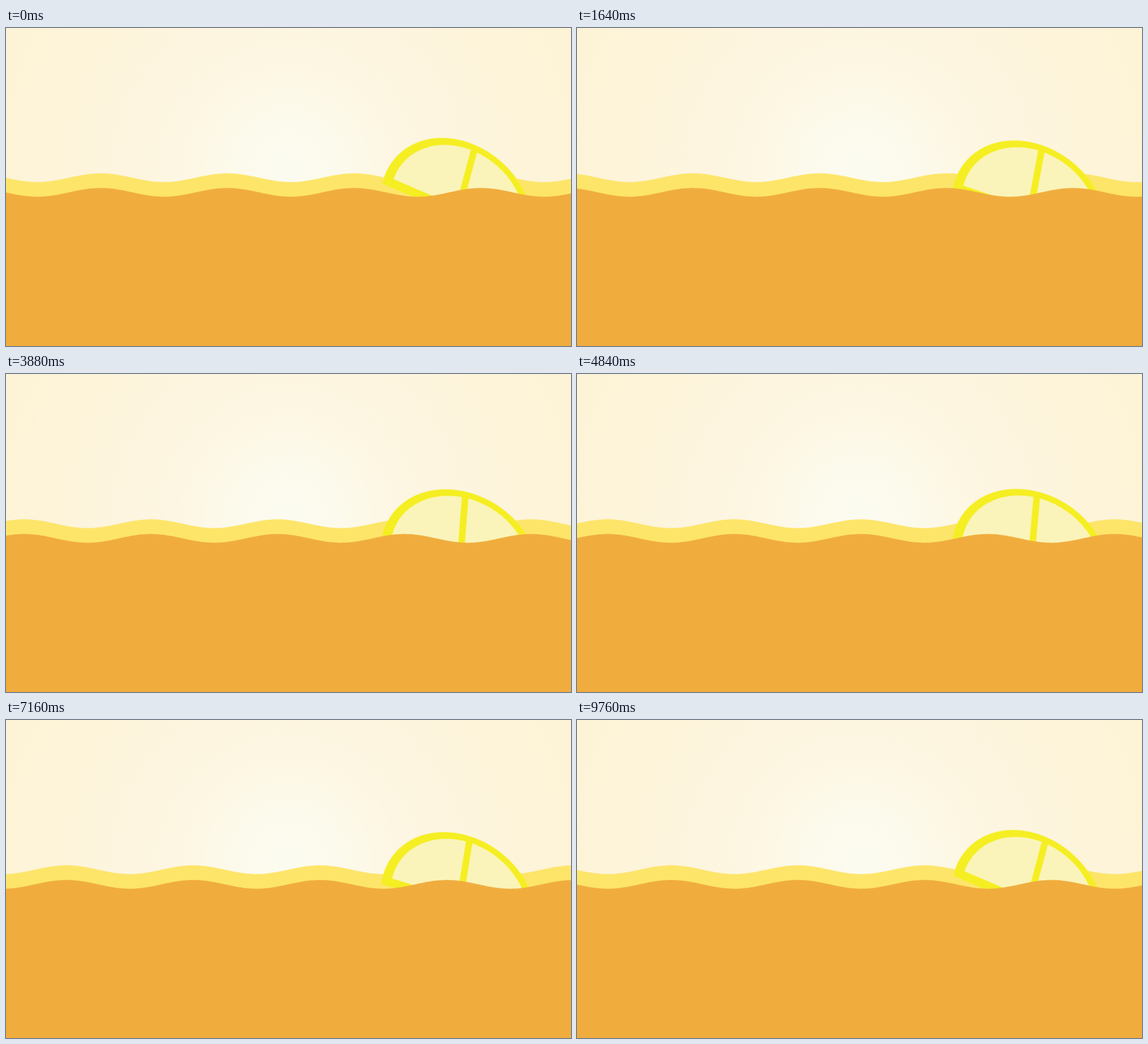
An HTML page for the animation above (9800 ms loop, 997 by 561 pixels).

```html
<!DOCTYPE html>
<html lang="en">
<head>
<meta charset="utf-8">
<title>Lemon on the waves</title>
<style>
  html, body { margin: 0; width: 100%; height: 100%; overflow: hidden; background: #fdf4d8; }
  svg { display: block; width: 997px; height: 561px; }

  .wave { animation: drift 9.8s linear infinite; }
  .back { fill: #fde569; }
  .front { fill: #f0ad3e; }
  @keyframes drift {
    from { transform: translateX(0); }
    to { transform: translateX(223.7px); }
  }

  .lemon { animation: bob 9.8s linear infinite; }
  .rind { fill: #f5ee22; }
  .flesh { fill: #faf4ba; }
  @keyframes bob {
    0%, 100% { transform: translate(797.3px, 323.3px) rotate(0deg); }
    16.73% { transform: translate(799.3px, 325.6px) rotate(-4.5deg); }
    39.59% { transform: translate(801.6px, 327.8px) rotate(-10.5deg); }
    44.9% { transform: translate(801.6px, 327.8px) rotate(-10.5deg); }
    59.18% { transform: translate(801px, 326.6px) rotate(-8.5deg); }
    73.06% { transform: translate(799.9px, 324.3px) rotate(-5.9deg); }
    83.27% { transform: translate(799.4px, 322.9px) rotate(-4.6deg); }
    91.84% { transform: translate(798.3px, 323.5px) rotate(-2.3deg); }
  }
</style>
</head>
<body>
<svg viewBox="0 0 997 561">
  <defs>
    <radialGradient id="glow" gradientUnits="userSpaceOnUse" cx="498" cy="250" r="560">
      <stop offset="0" stop-color="#fcfbf0"/>
      <stop offset=".16" stop-color="#fcfaec"/>
      <stop offset=".27" stop-color="#fdf8e6"/>
      <stop offset=".36" stop-color="#fdf6e2"/>
      <stop offset=".52" stop-color="#fdf5df"/>
      <stop offset=".72" stop-color="#fdf4da"/>
      <stop offset="1" stop-color="#fdf4d7"/>
    </radialGradient>
  </defs>
  <rect width="997" height="561" fill="url(#glow)"/>
  <g transform="translate(0 264.1)"><path class="wave back"/></g>
  <g class="lemon">
    <!-- half disc of radius 100, skewed into the slice -->
    <g transform="matrix(1.233 .53 -.302 1.127 0 0)">
      <path class="rind" d="M-106.5 6.5V0A105.8 106.7 0 0 1 105 0V6.5Z"/>
      <path class="flesh" d="M-93.6 -6.4A93.8 93.8 0 0 1 93.6 -6.4Z"/>
      <rect class="rind" x="-4.4" y="-96" width="8.8" height="96"/>
    </g>
  </g>
  <g transform="translate(0 289.9)"><path class="wave front"/></g>
</svg>
<script>
  const period = 223.7, crest = 167, height = 7.7;
  let d = "M-240 320";
  for (let x = -240; x <= 1010; x += 4) {
    const y = -height * Math.cos((x - crest) / period * 2 * Math.PI);
    d += `L${x} ${y.toFixed(2)}`;
  }
  d += "V320Z";
  document.querySelectorAll(".wave").forEach(wave => wave.setAttribute("d", d));
</script>
</body>
</html>
```
